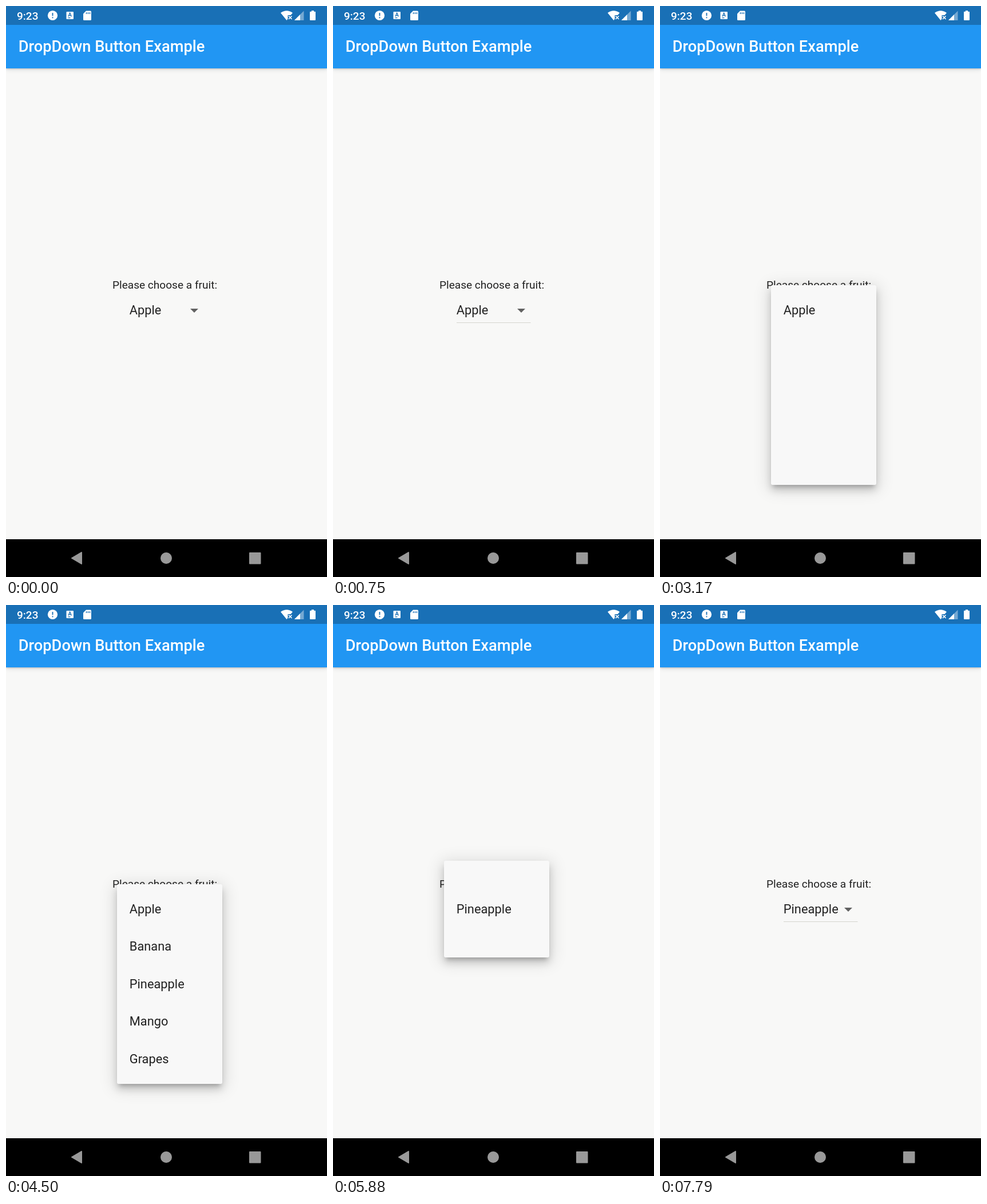
An HTML page that plays this animation: 561x998 px, repeating every 8 s.

```html
<!DOCTYPE html>
<html lang="en">
<head>
<meta charset="utf-8">
<title>DropDown Button Example</title>
<style>
  html, body { margin: 0; width: 100%; height: 100%; overflow: hidden; background: #f8f8f7; }
  body { position: relative; font-family: Roboto, sans-serif; }
  svg, #menu { position: absolute; left: 0; top: 0; width: 561px; height: 998px; }
  #bar {
    position: absolute; left: 0; top: 0; width: 561px; height: 109px; background: #2196f3;
    box-shadow: 0 1px 3px #0003, 0 2px 9px #0000001a;
  }
  #status { height: 33px; background: #1970b6; }
  #panel {
    position: absolute; left: 194px; width: 184px; border-radius: 2.7px; background: #f8f8f8;
    box-shadow: 0 7px 7px -4px #0003, 0 9px 14px #00000024, 0 5px 28px 5px #0000001f;
  }
  .item { font-size: 21.82px; fill: #212121; }
</style>
</head>
<body>
<div id="bar"><div id="status"></div></div>

<svg viewBox="0 0 561 998">
  <g fill="#fff" font-weight="500">
    <text x="19" y="24" font-size="19">9:23</text>
    <text x="21.8" y="80.2" font-size="27.27">DropDown Button Example</text>
    <circle cx="81.5" cy="16.5" r="8.6"/>
    <path d="M81.5 12v5.2M81.5 19.3v2" stroke="#1970b6" stroke-width="1.8"/>
    <rect x="105.5" y="10" width="12.5" height="13" rx="1"/>
    <path d="M109 18.5l2.7-6.5 2.7 6.5M110 16.6h3.4M108.5 20.7h4" fill="none" stroke="#1970b6" stroke-width="1.3"/>
    <path d="M140 8.5h7.5q1.5 0 1.5 1.5v13.5q0 1.5-1.5 1.5h-11q-1.5 0-1.5-1.5v-10z"/>
    <path d="M140.5 11v3M143.5 11v3M146.5 11v3" stroke="#1970b6" stroke-width="1.4"/>
    <path d="M480 12Q490.5 4.500 501 12L497.500 16H492.500V22.500L490.500 25z"/>
    <path d="M494 17.500l5.500 5.500m0-5.500l-5.500 5.500" stroke="#fff" stroke-width="1.7"/>
    <path d="M520.500 8.500V25H504z" opacity=".4"/>
    <path d="M514 15V25H504z"/>
    <path d="M534 8h4v1.800h2q1 0 1 1V24q0 1-1 1h-8q-1 0-1-1V10.800q0-1 1-1h2z"/>
  </g>

  <text x="186" y="494.2" font-size="19.09" fill="#212121">Please choose a fruit:</text>
  <text id="choice" class="item" x="215.8" y="539"></text>
  <path d="M322 529h14l-7 7z" fill="#616161"/>
  <rect id="underline" x="216" y="553" width="129.5" height="1" fill="#d4d4ce"/>

  <rect y="932" width="561" height="66"/>
  <g fill="#999" stroke="#999" stroke-width="2" stroke-linejoin="round">
    <path d="M115 965l17-10v20z"/>
    <circle cx="280" cy="965" r="9"/>
    <rect x="426" y="956" width="18.5" height="18.5"/>
  </g>
</svg>

<div id="menu">
  <div id="panel"></div>
  <svg id="items" viewBox="0 0 561 998"></svg>
</div>

<script>
const LOOP = 8000;
const FRUITS = ['Apple', 'Banana', 'Pineapple', 'Mango', 'Grapes'];
const ROW = 65.45, PADDING = 10.9, BUTTON_MIDDLE = 531.6, BASELINE = 7.4;
const MENU_HEIGHT = FRUITS.length * ROW + 2 * PADDING;

// Each opening: selected row, [time, progress] points, and the closing fade.
const OPENINGS = [
  { selected: 0, progress: [[3050, 0], [3170, .58], [3250, .6], [3460, 1]], close: [4550, 4710] },
  { selected: 2, progress: [[5745, 0], [6130, .965]], close: [7570, 7785] },
];

const $ = id => document.getElementById(id);
const span = (x, from, to) => Math.min(1, Math.max(0, (x - from) / (to - from)));
const mix = (a, b, k) => a + (b - a) * k;

function follow(points, time) {
  let value = points[0][1];
  for (let i = 1; i < points.length; i++) {
    const [t0] = points[i - 1], [t1, next] = points[i];
    value = mix(value, next, span(time, t0, t1));
  }
  return value;
}

const rows = FRUITS.map(name => {
  const text = document.createElementNS('http://www.w3.org/2000/svg', 'text');
  text.setAttribute('class', 'item');
  text.setAttribute('x', 215.8);
  text.textContent = name;
  return $('items').appendChild(text);
});

function drawMenu({ selected, progress, close }, time) {
  const p = follow(progress, time);
  const top = BUTTON_MIDDLE - PADDING - (selected + .5) * ROW;
  const rowTop = selected ? BUTTON_MIDDLE - ROW / 2 : top;
  const grow = span(p, .25, .5);
  const panelTop = mix(rowTop, top, grow);
  const panelBottom = mix(rowTop + ROW, top + MENU_HEIGHT, grow);

  $('menu').style.opacity = span(p, 0, .25) * (1 - span(time, ...close));
  $('panel').style.top = panelTop + 'px';
  $('panel').style.height = panelBottom - panelTop + 'px';

  // Rows appear one after another in the second half of the opening.
  const unit = .5 / (FRUITS.length + 1.5);
  rows.forEach((row, i) => {
    const start = .5 + (i + 1) * unit;
    row.setAttribute('y', BUTTON_MIDDLE + (i - selected) * ROW + BASELINE);
    row.style.opacity = i === selected ? 1 : span(p, start, Math.min(1, start + 1.5 * unit));
  });
}

function draw(time) {
  const firstClose = OPENINGS[0].close;
  $('choice').textContent = time < firstClose[0] ? 'Apple' : 'Pineapple';
  $('underline').style.opacity = span(time, 40, 450);
  drawMenu(OPENINGS[time < firstClose[1] ? 0 : 1], time);
}

function tick() {
  draw(performance.now() % LOOP);
  requestAnimationFrame(tick);
}
tick();
</script>
</body>
</html>
```
